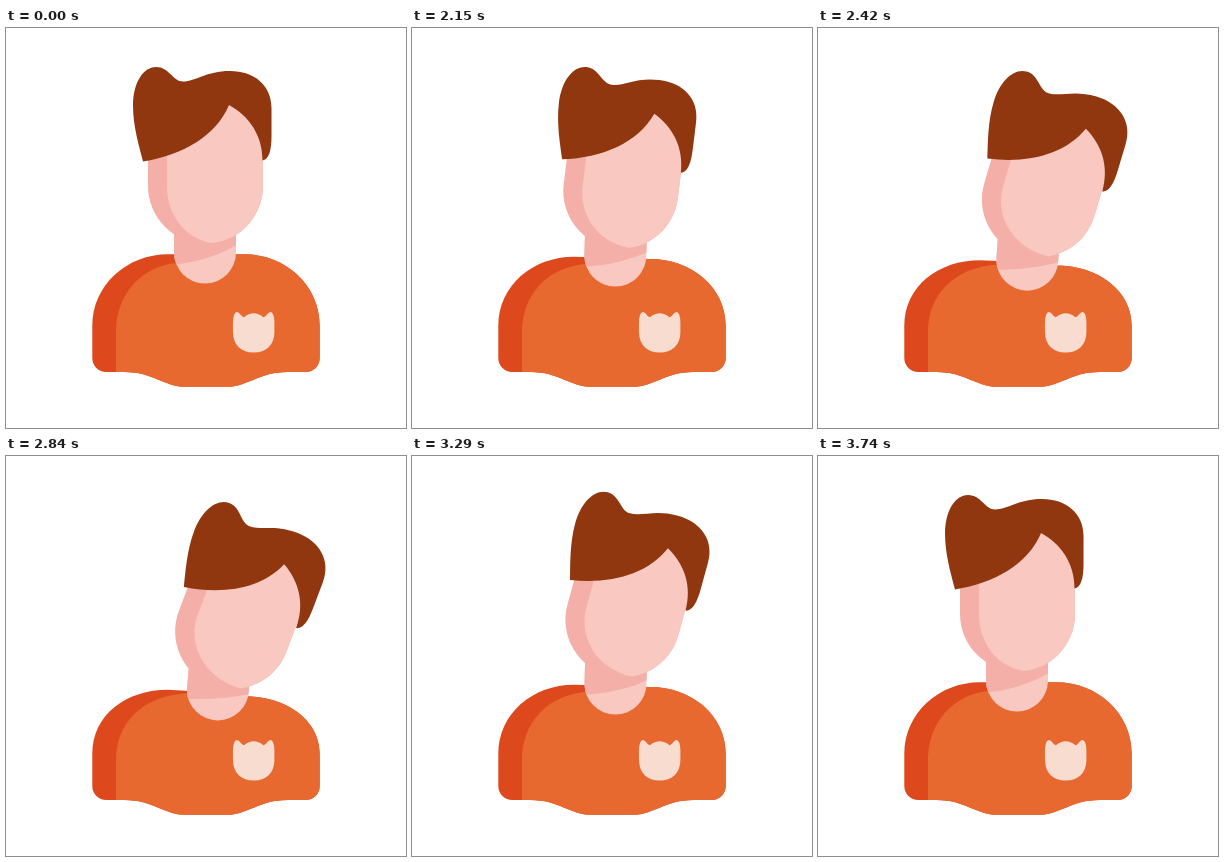
These frames come from a looping animation (400x400 px, 3.77 s). An HTML page with a canvas:

```html
<!DOCTYPE html>
<html lang="en">
<head>
<meta charset="utf-8">
<title>Head tilt</title>
<style>
html, body { margin: 0; width: 100%; height: 100%; overflow: hidden; background: #fff; }
canvas { display: block; width: 100vw; height: 100vh; }
</style>
</head>
<body>
<canvas id="stage"></canvas>
<script>
const LOOP = 3770, START = 2030, STEP = 30;
const SKIN = '#f8c8c1', SKIN_DARK = '#f4b0a8', HAIR = '#90370f';
const SHIRT = '#e8692f', SHIRT_DARK = '#dd481d', BADGE = '#f8dcd0';

const canvas = document.getElementById('stage');
const ctx = canvas.getContext('2d');

const hair = new Path2D(`M137 133.5 C133 118 127 98 127 78 C127 55 137 39 150 39
  C163 39 167 53.5 177 53.5 C190 53.5 200 43 224 43 C248 43 265.5 57 265.5 80
  L265.5 108 C265.5 122 263 131.5 256.5 132.5 C256.5 107 243 88 223 77
  C210 108 177 127 137 133.5Z`);
const head = new Path2D(`M142 110 Q142 75 177 75 L222 75 Q257 75 257 110 L257 158
  A57.5 57.5 0 0 1 142 158Z`);
const badge = new Path2D(`M227 304 C227 297 226.5 290 228.5 286 Q230.5 282 234 286
  Q236.5 289.8 238.3 289 Q247.7 281.5 257.1 289 Q258.9 289.8 261.4 286 Q264.9 282 266.9 286
  C268.9 290 268.4 297 268.4 304 C268.4 317 260 324.5 247.7 324.5 C235.4 324.5 227 317 227 304Z`);

// Cubic ease with y handles at 0 and 1
function ease(x, x1, x2) {
  if (x <= 0) return 0;
  if (x >= 1) return 1;
  let lo = 0, hi = 1, u = 0.5;
  for (let i = 0; i < 24; i++) {
    u = (lo + hi) / 2;
    const v = 1 - u;
    if (3 * v * v * u * x1 + 3 * v * u * u * x2 + u * u * u < x) lo = u;
    else hi = u;
  }
  return u * u * (3 - 2 * u);
}

function fill(path, color) {
  ctx.fillStyle = color;
  ctx.fill(path);
}

// Fills a shape, then a second shape kept inside it
function shaded(outer, outerColor, inner, innerColor) {
  fill(outer, outerColor);
  ctx.save();
  ctx.clip(outer);
  fill(inner, innerColor);
  ctx.restore();
}

function drawBody(p) {
  const l = 226.3 + 7.5 * p, r = 226.3 + 14 * p;
  const body = new Path2D(`M86.3 298 C86.3 ${257 + p} 121 ${l} 162 ${l} L180 ${l + p}
    L238 ${r} C279.5 ${r} 313.7 ${257 + 6 * p} 313.7 298 L313.7 330 A14 14 0 0 1 299.7 344
    L282 344 C252 344 243 358.8 220 358.8 L180 358.8 C157 358.8 148 344 118 344
    L100.3 344 A14 14 0 0 1 86.3 330Z`);
  const front = new Path2D(`M110 370 L110 304 C110 ${267 + p} 135 ${238 + p}
    ${171 + 13 * p} ${235 + 2 * p} L200 200 L330 200 L330 370Z`);
  shaded(body, SHIRT_DARK, front, SHIRT);
  fill(badge, BADGE);
}

function drawNeck(p) {
  const x = 13 * p, y = 9 * p, lean = 3 * p;
  const neck = new Path2D(`M${168 + x + lean} ${190 + y} L${168 + x} ${224.5 + y}
    A31 31 0 0 0 ${230 + x} ${224.5 + y} L${230 + x + lean} ${190 + y}Z`);
  const shade = new Path2D(`M${165 + x} 180 L${165 + x} ${237 + 6 * p}
    Q${205 + x} ${233 + 11 * p} ${232 + x} ${216 + 22 * p} L${240 + x} 180Z`);
  shaded(neck, SKIN, shade, SKIN_DARK);
}

function drawHead(p, h) {
  // The chin shadow slides round the jaw as the head tilts
  const face = new Path2D(`M161 70 L161 ${158 - 3 * h} C161 ${190 - 3 * h}
    ${182 + 9 * h} 212 ${208 + 20 * h} ${215.5 - 7 * h} L${208 + 20 * h} 225
    L270 225 L270 70Z`);
  ctx.save();
  ctx.translate(199 + 22.5 * p - 14.2 * h, 215 + 16.6 * p - 2.4 * h);
  ctx.rotate(20.8 * h * Math.PI / 180);
  ctx.translate(-199, -215);
  ctx.save();
  ctx.translate(-1.2 * h, 0);
  shaded(head, SKIN_DARK, face, SKIN);
  ctx.restore();
  fill(hair, HAIR);
  ctx.restore();
}

function draw(time) {
  ctx.setTransform(canvas.width / 400, 0, 0, canvas.height / 400, 0, 0);
  ctx.fillStyle = '#fff';
  ctx.fillRect(0, 0, 400, 400);

  let p = 0, h = 0;
  if (time >= START) {
    const t = START + Math.floor((time - START) / STEP) * STEP;
    const lean = ease((t - 1990) / 1000, 0.17, 0.1);
    p = lean - ease((t - 3010) / 600, 0.4, 0.3);
    h = lean - ease((t - 3020) / 750, 0.6, 0.25);
  }
  drawBody(p);
  drawNeck(p);
  drawHead(p, h);
}

function resize() {
  const dpr = window.devicePixelRatio || 1;
  canvas.width = Math.round(innerWidth * dpr);
  canvas.height = Math.round(innerHeight * dpr);
}

const began = performance.now();
function tick() {
  draw((performance.now() - began) % LOOP);
  requestAnimationFrame(tick);
}

addEventListener('resize', resize);
resize();
tick();
</script>
</body>
</html>
```
